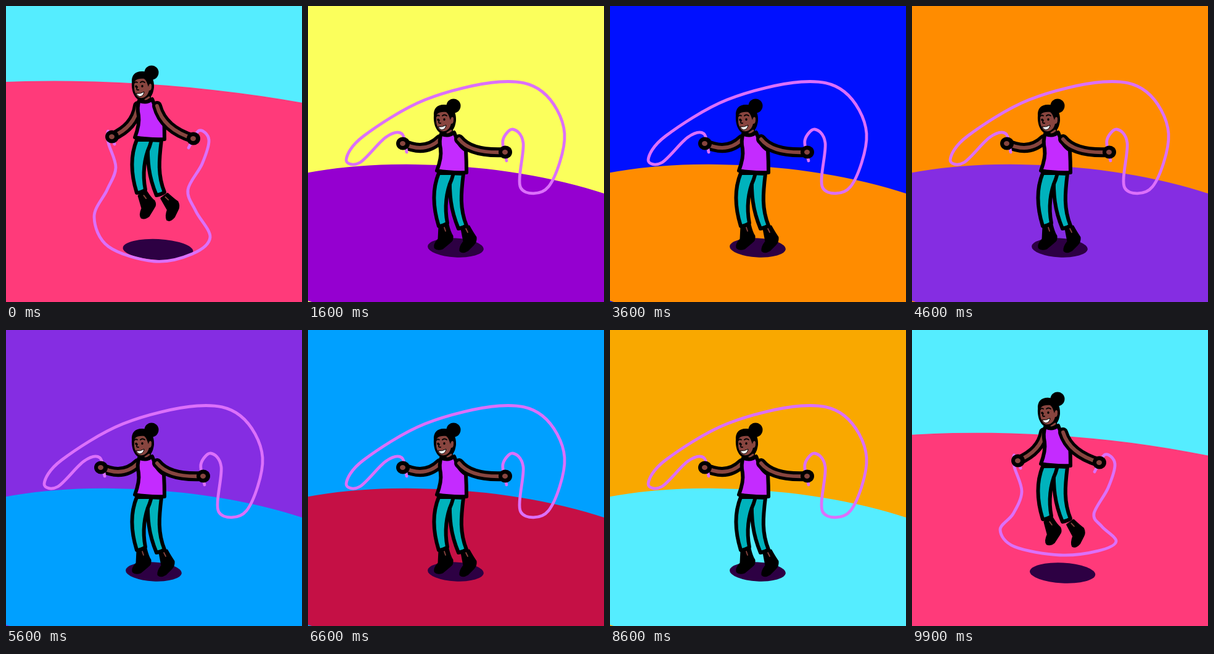
These frames come from a looping animation (480 by 480 pixels, 10000 ms). An HTML page with a canvas:

```html
<!DOCTYPE html>
<html lang="en">
<head>
<meta charset="utf-8">
<title>Skipping rope</title>
<style>
  html, body { margin: 0; width: 100%; height: 100%; overflow: hidden; }
  canvas { display: block; width: 100vw; height: 100vh; }
</style>
</head>
<body>
<canvas id="stage"></canvas>
<script>
const canvas = document.getElementById('stage');
const ctx = canvas.getContext('2d');
const ratio = window.devicePixelRatio || 1;
canvas.width = canvas.height = 480 * ratio;

const LOOP = 10000, BEAT = 1000, STEP = 100, LANDING = 300;
const INK = '#000', SKIN = '#88453f', TOP = '#c42bff', TEAL = '#00b2bc';
const ROPE = '#dc70fa', SHADE = '#2d0043';
const GROUNDS = ['#ff3a7a', '#fbff5c', '#9500d0', '#0010ff', '#ff8c00',
  '#852de2', '#00a0ff', '#c51045', '#f9a800', '#55edff'];

// Key points of the rope, from one handle to the other
const ropeOver = [160,237, 152,207, 126,213, 84,254, 62,249, 90,211, 190,152, 310,123,
  380,139, 416,207, 390,293, 345,295, 349,222, 332,200, 316,218, 322,251];
const ropeUnder = [176,224, 166,203, 166,222, 178,262, 164,298, 143,342, 166,390, 240,414,
  302,402, 331,375, 308,333, 295,298, 318,256, 329,217, 313,202, 296,230];

// Left elbow and hand, right elbow and hand
const armsWide = [190,240, 154,223, 264,240, 320,237];
const armsLow = [209,196, 172,212, 255,200, 304,215];

const mix = (from, to, k) => from.map((v, i) => v + (to[i] - v) * k);

function fill(shape, color) {
  ctx.fillStyle = color;
  ctx.fill(shape);
}

function stroke(shape, color, width) {
  ctx.strokeStyle = color;
  ctx.lineWidth = width;
  ctx.stroke(shape);
}

function outlined(shape, color, width = 6) {
  fill(shape, color);
  stroke(shape, INK, width);
}

function ellipse(x, y, rx, ry, color, tilt = 0) {
  const shape = new Path2D();
  shape.ellipse(x, y, rx, ry, tilt, 0, Math.PI * 2);
  fill(shape, color);
}

const art = {
  head: new Path2D('M204 178C203 165 211 159 222 160C235 161 241 174 240 186C239 194 237 198 235 201L235 211L221 211L221 207C209 208 203 192 204 178Z'),
  face: new Path2D('M208 182C207 175 212 171 224 172C228 175 229 180 231 185C232 178 237 179 236 185C236 190 234 191 232 191C230 200 224 204 217 203C210 201 207 190 208 182Z'),
  features: new Path2D('M208 179Q210 176 213 178M218 178Q221 175 225 178M213 185Q210 191 215 190'),
  smile: new Path2D('M211 196Q218 197 224 193Q223 200 217 201Q213 200 211 196Z'),
  neck: new Path2D('M226 206L232 202'),
  shirt: new Path2D('M216 207Q227 213 237 205C241 214 243 226 256 234Q257 252 257 270Q232 271 209 267Q217 246 215 232Q212 218 216 207Z'),
  leftLeg: new Path2D('M212 271C201 298 203 328 212 357Q219 357 226 352C221 327 224 301 233 281L236 271Z'),
  rightLeg: new Path2D('M230 271C229 305 231 330 244 361Q251 360 257 356C246 329 248 304 252 272Z'),
  leftShoe: new Path2D('M213 357L227 354Q230 367 234 373Q235 380 230 383L218 393Q210 396 206 392Q204 387 212 378Z'),
  rightShoe: new Path2D('M249 361L261 357Q267 368 272 375Q273 382 268 387L259 396Q251 401 247 397Q246 391 253 382Z'),
  leftAnkle: new Path2D('M221 359L223 365'),
  rightAnkle: new Path2D('M256 361L259 367')
};

function shoe(shape, ankle, x, y, lift) {
  ctx.save();
  ctx.translate(x + 3 * lift, y + 2 * lift);
  ctx.rotate(-0.33 * lift);
  ctx.translate(-x, -y);
  outlined(shape, INK, 3);
  stroke(ankle, SKIN, 1.8);
  ctx.restore();
}

function arm(x, y, ex, ey, hx, hy) {
  const shape = new Path2D();
  shape.moveTo(x, y);
  shape.quadraticCurveTo(ex, ey, hx, hy);
  stroke(shape, INK, 16);
  stroke(shape, SKIN, 6);
}

function hand(x, y) {
  ellipse(x, y, 11, 10.5, INK);
  ellipse(x - 0.5, y, 4.5, 4, SKIN);
}

function rope(p) {
  const last = p.length / 2 - 1;
  const at = i => {
    const n = 2 * Math.max(0, Math.min(last, i));
    return [p[n], p[n + 1]];
  };
  const shape = new Path2D();
  shape.moveTo(p[0], p[1]);
  for (let i = 0; i < last; i++) {
    const [a, b, c, d] = [at(i - 1), at(i), at(i + 1), at(i + 2)];
    shape.bezierCurveTo(
      b[0] + (c[0] - a[0]) / 6, b[1] + (c[1] - a[1]) / 6,
      c[0] - (d[0] - b[0]) / 6, c[1] - (d[1] - b[1]) / 6, c[0], c[1]);
  }
  stroke(shape, ROPE, 4.8);
}

function body(lift, dy, arms) {
  ctx.save();
  ctx.translate(0, dy);
  shoe(art.leftShoe, art.leftAnkle, 221, 361, lift);
  shoe(art.rightShoe, art.rightAnkle, 258, 363, lift);
  outlined(art.rightLeg, TEAL);
  outlined(art.leftLeg, TEAL);
  ctx.restore();

  arm(214, 216 + dy, ...arms.slice(0, 4));

  ctx.save();
  ctx.translate(0, dy);
  ellipse(236, 162, 11.5, 11.5, INK);
  fill(art.head, INK);
  fill(art.face, SKIN);
  stroke(art.features, INK, 1.8);
  ellipse(211, 184.5, 1.7, 2, INK);
  ellipse(221, 184, 1.7, 2, INK);
  fill(art.smile, '#fff');
  stroke(art.smile, INK, 1);
  stroke(art.neck, SKIN, 3);
  outlined(art.shirt, TOP);
  ctx.restore();

  arm(245, 216 + dy, ...arms.slice(4));
}

// Each landing sends out a disc of the next colour.
function ground(time) {
  const beats = (time - LANDING) / BEAT;
  const step = Math.floor(beats);
  const age = (beats - step) * 10;
  const radius = age * (66.4 + age * (-10.174 + age * 0.865));
  ctx.fillStyle = GROUNDS[(step + 10) % 10];
  ctx.fillRect(0, 0, 480, 480);
  ellipse(240, 391, radius * 3, radius, GROUNDS[(step + 1) % 10], 0.079);
}

function draw(time) {
  ctx.setTransform(canvas.width / 480, 0, 0, canvas.height / 480, 0, 0);
  ctx.lineCap = ctx.lineJoin = 'round';

  const tenth = time % BEAT / STEP;
  const fromTop = Math.min(tenth, 10 - tenth);
  const lift = Math.max(0, 1 - (fromTop / 3.7) ** 2);
  const swell = Math.max(0, 1 - fromTop / 3);

  // The rope is overhead at 6, comes down in front, and returns behind.
  const front = tenth >= 6;
  const low = front ? Math.min(1, (tenth - 6) / 3) : 1 - tenth / 6;
  const sag = front ? 0.57 : 1;
  const under = ropeUnder.map((v, i) => i % 2 && v > 300 ? 300 + (v - 300) * sag : v);
  const line = mix(ropeOver, under, low);
  const arms = mix(armsWide, armsLow, low);

  ground(time);
  ellipse(239.5 + 7 * swell, 392 + 3 * swell, 45.5 + 11.5 * swell, 15.5 + 1.5 * swell, SHADE, 0.05);
  if (!front) rope(line);
  body(lift, -54 * lift, arms);
  if (front) rope(line);
  hand(arms[2], arms[3]);
  hand(arms[6], arms[7]);
}

const start = performance.now();
function tick() {
  const elapsed = (performance.now() - start) % LOOP;
  draw(Math.floor(elapsed / STEP) * STEP);
  requestAnimationFrame(tick);
}
tick();
</script>
</body>
</html>
```
